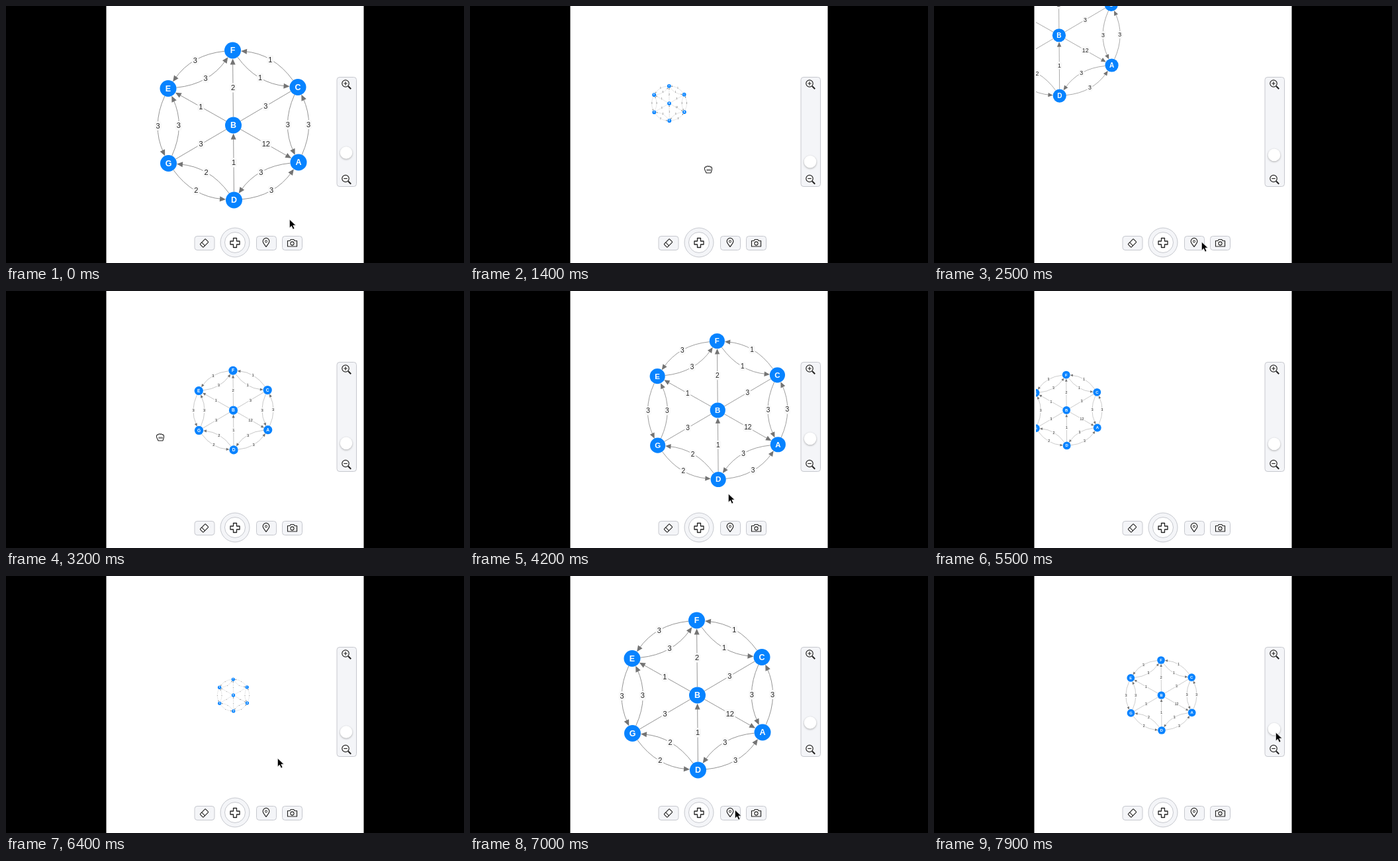
These frames come from a looping animation (692 by 388 pixels, 8 s). An HTML page with a canvas:

```html
<!DOCTYPE html>
<html>
<head>
<meta charset="utf-8">
<style>
  html, body { margin: 0; width: 692px; height: 388px; overflow: hidden; background: #000; }
  canvas { display: block; }
</style>
</head>
<body>
<canvas id="stage" width="692" height="388"></canvas>
<script>
const ctx = document.getElementById('stage').getContext('2d');
const LOOP = 8000, STEP = 100, CENTER = [343.5, 180], NODE_R = 12.5;

const nodes = {
  B: [0, 0], F: [-1, -113], C: [97.5, -57.5], A: [98.5, 56],
  D: [1, 113], G: [-98, 57.5], E: [-98.5, -55.5]
};
// from, to, weight; straight edges pass through the hub
const straight = [['B', 'F', 2], ['B', 'E', 1], ['B', 'A', 12], ['D', 'B', 1],
                  ['C', 'B', 3, true], ['G', 'B', 3, true]];
const rim = [['F', 'E', 3], ['E', 'G', 3], ['G', 'D', 2], ['D', 'A', 3], ['A', 'C', 3], ['C', 'F', 1]];
const curved = rim.flatMap(([a, b, w]) => [[a, b, w], [b, a, w]]);

// time, zoom, pan x, pan y (pan in graph units)
const viewTrack = [
  [0, 1, 0, 0], [800, 1, 0, 0], [1200, .232, 0, 0], [1400, .232, -183, -142],
  [1600, .232, -765, -672], [2300, .232, -765, -672], [2700, 1, 0, 0], [2800, 1, 0, 0],
  [3200, .53, 0, 0], [3700, .53, 208, 0], [3900, .53, 208, 0], [4400, 1, 0, 0],
  [4600, 1, 0, 0], [5000, .473, 0, 0], [5500, .473, -303, 0], [5550, .473, -303, 0],
  [6000, 1, 0, 0], [6100, 1, 0, 0], [6400, .212, 0, 0], [6450, .212, 0, 0],
  [6700, .212, -698, 0], [7000, 1, 0, 0], [7400, 1, 0, 0], [7900, .469, 0, 0]
];
// time, pointer x, pointer y
const pointerTrack = [
  [0, 428, 322], [300, 428, 322], [500, 393, 318], [800, 393, 318], [1200, 402, 280],
  [1400, 360, 247], [1600, 225, 124], [1700, 225, 124], [2200, 404, 356], [2800, 404, 356],
  [3200, 233, 221], [3700, 343, 221], [3900, 393, 352], [4000, 393, 352], [4200, 390, 306],
  [4400, 300, 235], [4600, 300, 235], [5000, 285, 230], [5500, 141, 230], [5700, 397, 346],
  [6100, 397, 346], [6400, 410, 275], [6450, 390, 250], [6700, 242, 250], [6850, 400, 353],
  [7000, 400, 353], [7100, 405, 357], [7200, 405, 357], [7500, 516, 226], [7900, 516, 236]
];
const grabs = [[1200, 1700], [3200, 3700], [5000, 5500], [6450, 6700]];

function sample(track, t, ease = u => u) {
  const i = track.findIndex(k => k[0] > t);
  if (i < 0) return track[track.length - 1].slice(1);
  const a = track[i - 1], b = track[i];
  const u = ease((t - a[0]) / (b[0] - a[0]), a, b);
  return a.slice(1).map((v, j) => v + (b[j + 1] - v) * u);
}
// Recentering eases out; dragging and zooming out are linear
const viewEase = (u, a, b) => b[1] > a[1] ? 1 - (1 - u) ** 2 : u;

function paint(fill, stroke, width = 1) {
  if (fill) { ctx.fillStyle = fill; ctx.fill(); }
  if (stroke) { ctx.strokeStyle = stroke; ctx.lineWidth = width; ctx.stroke(); }
}
function circle(x, y, r, ...style) {
  ctx.beginPath(); ctx.arc(x, y, r, 0, 7); paint(...style);
}
function box(x, y, w, h, r, ...style) {
  ctx.beginPath(); ctx.roundRect(x, y, w, h, r); paint(...style);
}
function path(d, ...style) {
  const p = new Path2D(d);
  const [fill, stroke, width = 1] = style;
  if (fill) { ctx.fillStyle = fill; ctx.fill(p); }
  if (stroke) { ctx.strokeStyle = stroke; ctx.lineWidth = width; ctx.stroke(p); }
}
function at(x, y, draw) {
  ctx.save(); ctx.translate(x, y); draw(); ctx.restore();
}
function text(str, x, y, font, color) {
  ctx.font = font + ' "Liberation Sans", Arial, sans-serif';
  ctx.fillStyle = color;
  ctx.fillText(str, x, y);
}
function toward([x, y], [tx, ty], dist) {
  const k = dist / Math.hypot(tx - x, ty - y);
  return [x + (tx - x) * k, y + (ty - y) * k];
}

function edge([from, to, weight, plain], bend) {
  const a = nodes[from], b = nodes[to];
  const dx = b[0] - a[0], dy = b[1] - a[1], len = Math.hypot(dx, dy);
  const c = [(a[0] + b[0]) / 2 - dy / len * bend, (a[1] + b[1]) / 2 + dx / len * bend];
  const p = toward(a, c, NODE_R), q = toward(b, c, NODE_R), base = toward(b, c, NODE_R + 5);
  ctx.beginPath();
  ctx.moveTo(...p);
  ctx.quadraticCurveTo(...c, ...(plain ? q : base));
  paint(null, '#949494', 1);
  if (!plain) at(...q, () => {
    ctx.rotate(Math.atan2(q[1] - c[1], q[0] - c[0]));
    path('M0 0L-9 -4L-9 4Z', '#747474');
  });
  const x = (p[0] + q[0]) / 4 + c[0] / 2, y = (p[1] + q[1]) / 4 + c[1] / 2;
  const w = weight > 9 ? 16 : 10;
  box(x - w / 2, y - 7, w, 14, 3, '#f9f9f9');
  text(weight, x, y + .5, '11px', '#222');
}

function graph([zoom, panX, panY]) {
  at(CENTER[0] + panX * zoom, CENTER[1] + panY * zoom, () => {
    ctx.scale(zoom, zoom);
    straight.forEach(e => edge(e, 0));
    curved.forEach(e => edge(e, 26));
    for (const [name, [x, y]] of Object.entries(nodes)) {
      circle(x, y, NODE_R, '#0783ff');
      text(name, x, y + .7, 'bold 12.5px', '#fff');
    }
  });
}

function magnifier(y, sign) {
  at(513, y, () => {
    circle(0, 0, 5.2, '#fff', '#222', 1.2);
    path('M4 4L8.2 8.2', null, '#222', 2);
    path(sign, null, '#222', 1.2);
  });
}

function controls(zoom) {
  const fill = '#f4f5f8', line = '#c6c8ce', ink = '#222';
  box(500, 107.5, 29.5, 165, 4, fill, line);
  magnifier(117, 'M-2.7 0H2.7M0 -2.7V2.7');
  magnifier(260.5, 'M-2.7 0H2.7');
  ctx.save();
  ctx.shadowColor = 'rgba(0,0,0,.3)'; ctx.shadowBlur = 3; ctx.shadowOffsetY = 1;
  circle(514, 221.5 + 17.8 * (1 - zoom), 9.3, '#fff');
  ctx.restore();

  for (const x of [285, 378.5, 417.5]) box(x, 347.5, 30, 21, 4, fill, line);
  circle(346, 357, 22, fill, line);
  circle(346, 357, 15.5, '#fff', line);
  at(346, 357.5, () => path('M-2.5 -7H2.5V-2.5H7V2.5H2.5V7H-2.5V2.5H-7V-2.5H-2.5Z', '#fff', ink, 1.3));
  at(299.5, 358, () => {
    ctx.rotate(-Math.PI / 4);
    box(-5.8, -3.5, 11.6, 7, 1.2, '#fff', ink, 1.1);
    path('M-2 -3.5V3.5', null, ink);
  });
  at(393, 357, () => {
    path('M0 6.5C-2 3.5 -4.8 1 -4.8 -1.8A4.8 4.8 0 0 1 4.8 -1.8C4.8 1 2 3.5 0 6.5Z', '#fff', ink, 1.2);
    circle(0, -1.6, 1.6, null, ink);
  });
  at(432.5, 358, () => {
    path('M-7 -3.5H-3.6L-2.3 -5.5H2.3L3.6 -3.5H7V5H-7Z', '#fff', ink, 1.2);
    circle(0, .5, 2.6, null, ink, 1.1);
  });
}

function pointer([x, y], grabbing) {
  at(x, y, () => grabbing
    ? path('M-5.5 -1C-6 -3 -4.5 -4.5 -3 -4C-2.5 -5.6 -.5 -5.6 0 -4.6C1 -5.6 2.7 -5 3 -4C4.8 -4.5 5.8 -3 5.5 -1C5.5 1.5 4.5 2.5 4 5H-3C-3.5 3 -5 2 -5.5 -1ZM-1.6 -.8V2M.6 -.8V2M2.8 -.8V2',
      '#fff', '#222', 1.1)
    : path('M.3 0V13.2L3.4 10.3L5.6 15.2L8 14.1L5.8 9.3H10Z', '#000', '#fff', .8));
}

function draw(now) {
  const t = Math.floor(now % LOOP / STEP) * STEP;
  const view = sample(viewTrack, t, viewEase);
  ctx.textAlign = 'center';
  ctx.textBaseline = 'middle';
  ctx.lineJoin = 'round';
  ctx.fillStyle = '#fff';
  ctx.fillRect(0, 0, 692, 388);
  ctx.save();
  ctx.beginPath(); ctx.rect(154, 0, 386, 388); ctx.clip();
  graph(view);
  ctx.restore();
  controls(view[0]);
  pointer(sample(pointerTrack, t), grabs.some(([a, b]) => t >= a && t <= b));
  ctx.fillStyle = '#000';
  ctx.fillRect(0, 0, 151.5, 388);
  ctx.fillRect(540.5, 0, 152, 388);
  requestAnimationFrame(draw);
}
requestAnimationFrame(draw);
</script>
</body>
</html>
```
